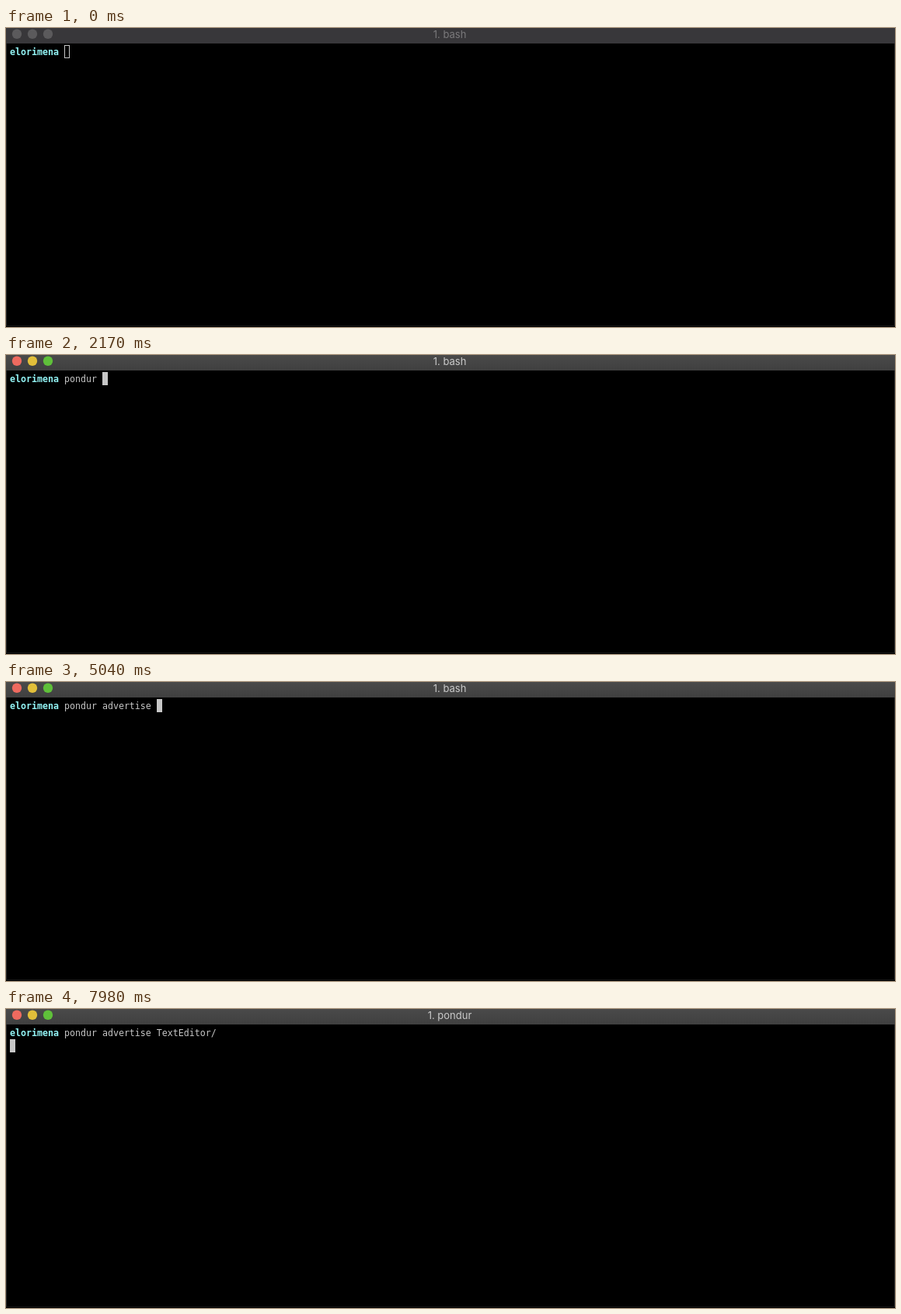
Write an HTML page that moves like this. It is 1144 px wide and 386 px high and loops after 8190 ms.

```html
<!DOCTYPE html>
<html lang="en">
<head>
<meta charset="utf-8">
<title>Terminal</title>
<style>
  html, body { margin: 0; width: 100%; height: 100%; overflow: hidden; background: #000; }
  svg { display: block; width: 1144px; height: 386px; }
  .mono { font: 11.627px "DejaVu Sans Mono", monospace; white-space: pre; fill: #c7c7c7; }
  .prompt { font-weight: bold; fill: #93f5f6; }
  #title { font: 13px Inter, sans-serif; text-anchor: middle; }
</style>
</head>
<body>
<svg viewBox="0 0 1144 386">
  <defs>
    <linearGradient id="active" x2="0" y2="1">
      <stop offset="0" stop-color="#4a4a4a"/>
      <stop offset="1" stop-color="#404040"/>
    </linearGradient>
  </defs>
  <rect width="1144" height="386"/>
  <path d="M.5 20V384M1143.5 20V384" stroke="#2b2b2b"/>
  <path d="M0 384.5H1144" stroke="#171717"/>
  <rect id="bar" width="1144" height="20"/>
  <g id="lights">
    <circle cx="14" cy="7.75" r="6.2"/>
    <circle cx="34" cy="7.75" r="6.2"/>
    <circle cx="54" cy="7.75" r="6.2"/>
  </g>
  <text id="title" x="571" y="13"></text>
  <text class="mono prompt" x="5" y="35">elorimena</text>
  <text class="mono" id="command" x="75" y="35"></text>
  <rect id="cursor" stroke="#c7c7c7"/>
</svg>
<script>
const LOOP = 8190, FOCUS = 280, ENTER = 5950, RETITLE = 6720;
const CELL = 7, ROW = 17, LEFT = 5, TOP = 22, PROMPT_CELLS = 10;
const COMMAND = "pondur advertise TextEditor/";
const LIGHTS = ["#ee6a5f", "#e2bf3a", "#5fc03a"];

// Time of each keystroke; the last one completes the path.
const KEYS = [1050, 1190, 1330, 1610, 1680, 1750, 2100, 2240, 2520, 2660,
  3010, 3080, 3360, 3430, 3920, 4130, 4410, 5320, 5530];

const $ = id => document.getElementById(id);
const lights = [...$("lights").children];
const setAttrs = (el, attrs) => {
  for (const name in attrs) el.setAttribute(name, attrs[name]);
};

function draw(t) {
  const focused = t >= FOCUS;
  const pressed = KEYS.filter(k => k <= t).length;
  const typed = pressed === KEYS.length ? COMMAND.length : pressed;
  const entered = t >= ENTER;

  setAttrs($("bar"), { fill: focused ? "url(#active)" : "#38373a" });
  lights.forEach((light, i) => setAttrs(light, { fill: focused ? LIGHTS[i] : "#5b5a5c" }));
  setAttrs($("title"), { fill: focused ? "#cbcbcb" : "#7b7a7c" });
  $("title").textContent = t >= RETITLE ? "1. pondur" : "1. bash";
  $("command").textContent = COMMAND.slice(0, typed);

  const column = entered ? 0 : PROMPT_CELLS + typed;
  setAttrs($("cursor"), {
    x: LEFT + column * CELL + 0.5,
    y: TOP + (entered ? ROW : 0) + 0.5,
    width: CELL - 1,
    height: ROW - 1,
    fill: focused ? "#c7c7c7" : "none"
  });
}

function tick() {
  draw((performance.now() - start) % LOOP);
  requestAnimationFrame(tick);
}

const start = performance.now();
tick();
</script>
</body>
</html>
```
